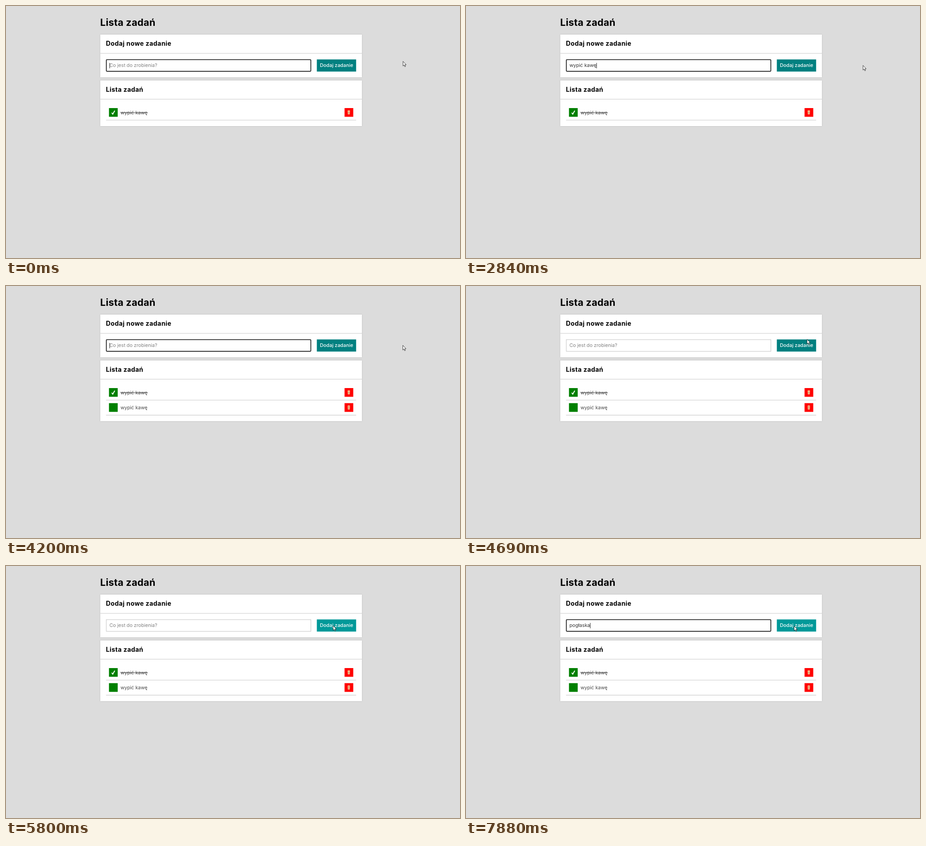
An HTML page that plays this animation: 1004x558 px, repeating every 8 s.

```html
<!DOCTYPE html>
<html lang="pl">
<head>
<meta charset="utf-8">
<title>Lista zadań</title>
<style>
  html, body { margin: 0; width: 100%; height: 100%; overflow: hidden; background: #dcdcdc; }
  svg { display: block; width: 1004px; height: 558px; }
  text { font: 400 10.67px Inter, "Open Sans", sans-serif; white-space: pre; }
  .title { font-weight: 700; font-size: 21.33px; letter-spacing: .015em; }
  .heading { font-weight: 700; font-size: 14px; letter-spacing: .03em; }
  .button { font-weight: 500; fill: #fff; letter-spacing: .01em; }
  .card { fill: #fff; filter: drop-shadow(0 0 1.3px #aaa); }
  .line { stroke: #d3d3d3; stroke-width: 1.3; }
</style>
</head>
<body>
<svg viewBox="0 0 1004 558">
  <defs>
    <g id="row">
      <rect x="227.7" y="226" width="19.3" height="19.3" fill="#008000"/>
      <text x="253.3" y="239.5" fill="#484848">wypić kawę</text>
      <rect x="748.7" y="226" width="19.3" height="19.3" fill="#f00"/>
      <g fill="#f3cf9b">
        <path d="M755.2 231.6h5.8v1.1h-5.8zM756.9 230.9h2.4v1h-2.4z"/>
        <path d="M755.5 233.1h5.2l-.4 6.9h-4.4z"/>
        <path d="M757.2 234.2v4.8M759 234.2v4.8" stroke="#d8653c" stroke-width=".7"/>
      </g>
      <path class="line" d="M221.3 252.6H774.3"/>
    </g>
  </defs>

  <text class="title" x="208.3" y="44">Lista zadań</text>

  <rect class="card" x="208.4" y="63.2" width="578.8" height="94.8"/>
  <text class="heading" x="221" y="88.2">Dodaj nowe zadanie</text>
  <path class="line" d="M208.4 104.8H787.2"/>
  <rect id="field" x="221.8" y="118.8" width="452.4" height="25.8" fill="#fff"/>
  <text id="entry" x="228.8" y="135.3"></text>
  <rect id="caret" y="126" width="1" height="12" fill="#222"/>
  <rect id="button" x="687.4" y="118.3" width="86.9" height="26.9"/>
  <text class="button" x="694.2" y="135.3">Dodaj zadanie</text>

  <rect id="list" class="card" x="208.4" y="164.7" width="578.8"/>
  <text class="heading" x="221" y="189.7">Lista zadań</text>
  <path class="line" d="M208.4 206.4H787.2"/>
  <use href="#row"/>
  <path d="M253.3 236.3H313.5" stroke="#333" stroke-width=".9"/>
  <path d="M233.8 236.4l2.3 3.1 4.4-7.8" fill="none" stroke="#fff" stroke-width="1.9"/>
  <use id="added" href="#row" y="33.4"/>

  <path id="cursor" d="M0 0V10.4L2.4 8.2 4 12 5.6 11.3 4 7.6H7.1Z" fill="#fff" stroke="#111" stroke-width=".8"/>
</svg>
<script>
const LOOP = 8000, SUBMIT = 3350, BLUR = 4350, FOCUS = 6030, BLINK = 530;
const $ = id => document.getElementById(id);
const set = (id, attrs) => {
  for (const name in attrs) $(id).setAttribute(name, attrs[name]);
};
const show = (id, on) => set(id, { visibility: on ? 'visible' : 'hidden' });

// One letter every `pace` ms; an empty field blinks its caret from `blink` on.
const sessions = [
  { end: SUBMIT, text: 'wypić kawę', start: 990, pace: 200, blink: -70 },
  { end: FOCUS, text: '', start: SUBMIT, pace: 200, blink: 3870 },
  { end: LOOP, text: 'pogłaska', start: 6840, pace: 148, blink: 6060 }
];

// Pointer moves: curves from one resting place to the next.
const moves = [
  { start: 140, end: 210, from: [878, 122.5], via: [876, 127], to: [878, 131.5], ease: k => k },
  { start: 4100, end: 4840, from: [878, 131.5], via: [799, 97], to: [553, 146], ease: k => k ** 3 },
  { start: 5100, end: 5900, from: [553, 146], via: [650, 100], to: [725.7, 133], ease: k => 1 - (1 - k) ** 2 }
];

function pointer(t) {
  const move = moves.findLast(m => t >= m.start) || moves[0];
  const k = (t - move.start) / (move.end - move.start);
  const u = move.ease(Math.min(1, Math.max(0, k)));
  return [0, 1].map(i =>
    move.from[i] * (1 - u) ** 2 + move.via[i] * 2 * u * (1 - u) + move.to[i] * u * u);
}

function draw(t) {
  const { text, start, pace, blink } = sessions.find(s => t < s.end);
  const value = text.slice(0, Math.max(0, Math.floor((t - start) / pace) + 1));
  const focused = t < BLUR || t >= FOCUS;
  const lit = Math.floor((t - blink) / BLINK) % 2 === 0;

  $('entry').textContent = value || 'Co jest do zrobienia?';
  set('entry', { fill: value ? '#333' : '#808080' });
  set('caret', { x: 228.8 + (value ? $('entry').getComputedTextLength() : 0) });
  show('caret', focused && (value || lit));
  set('field', focused
    ? { rx: 1.5, stroke: '#101010', 'stroke-width': 1.6 }
    : { rx: 0, stroke: '#ccc', 'stroke-width': 1.2 });

  const [x, y] = pointer(t);
  const hover = x > 687 && x < 774 && y > 119 && y < 145;
  set('button', { fill: hover ? '#009999' : '#008080' });
  set('cursor', { transform: `translate(${x} ${y})` });

  const added = t >= SUBMIT;
  show('added', added);
  set('list', { height: added ? 134.7 : 101.3 });
}

const begin = performance.now();
function tick() {
  draw((performance.now() - begin) % LOOP);
  requestAnimationFrame(tick);
}
tick();
</script>
</body>
</html>
```
